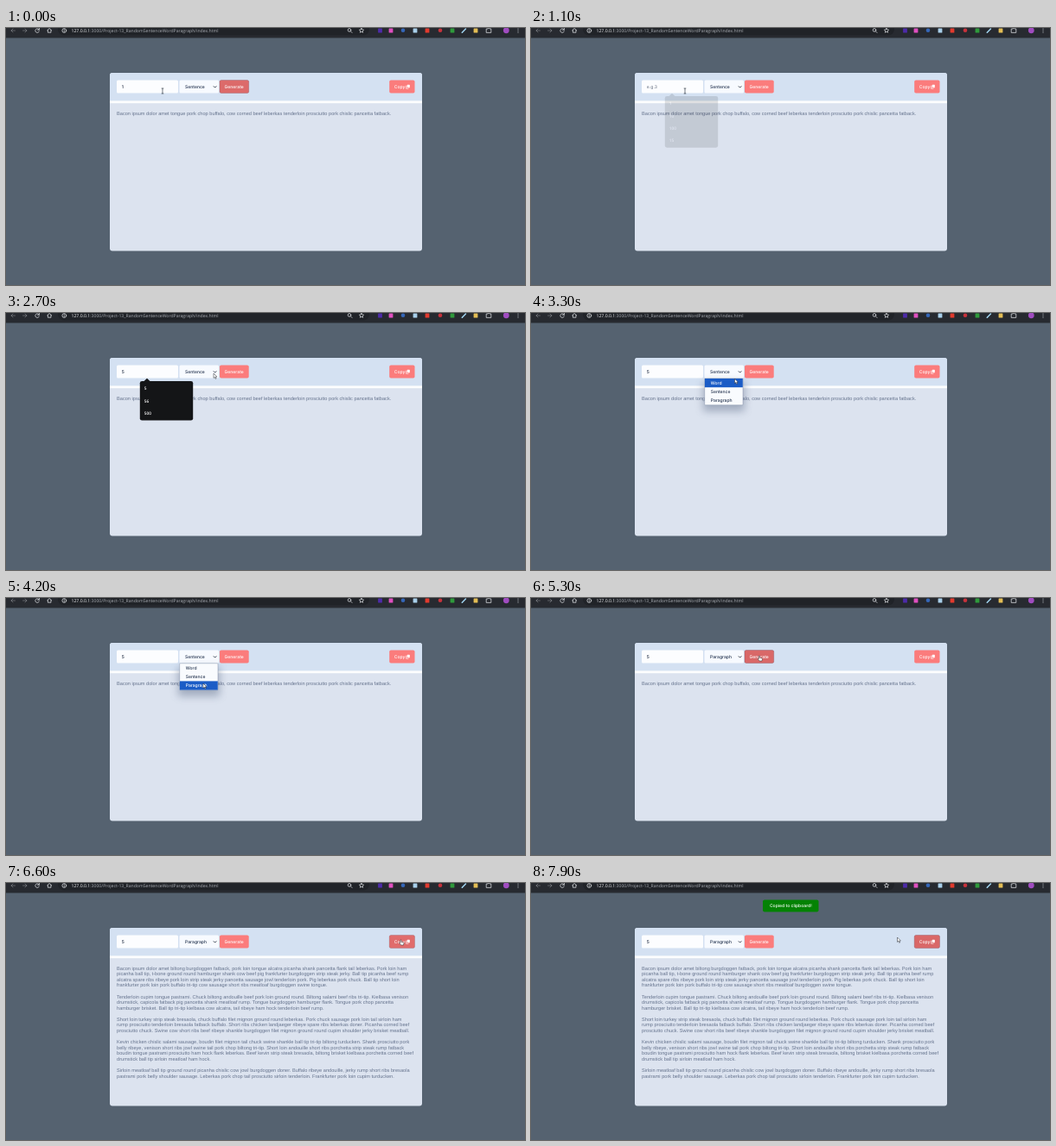
Recreate the animation shown at these times as an HTML page. Size 600 px wide and 298 px high, loop 8000 ms.

```html
<!DOCTYPE html>
<html lang="en">
<head>
<meta charset="utf-8">
<title>Random text generator</title>
<style>
  html, body { margin: 0; width: 100%; height: 100%; overflow: hidden; background: #556270; }
  svg { display: block; width: 100vw; height: 100vh; }
  text { text-rendering: geometricPrecision; white-space: pre; }
  .ui { font: 500 5.05px Inter, "Open Sans", sans-serif; }
  .copy { font: 5.63px "Liberation Sans", Arial, sans-serif; fill: #66748e; }
  .url { font: 5.13px "Open Sans", "Noto Sans", sans-serif; fill: #a9adb3; }
  .hint { font: 600 4.8px "Open Sans", "Noto Sans", sans-serif; fill: #f4f4f4; }
  .line { fill: none; stroke: #d3d6da; stroke-width: .8; stroke-linecap: round; stroke-linejoin: round; }
</style>
</head>
<body>
<svg viewBox="0 0 600 298" preserveAspectRatio="none">
  <defs>
    <filter id="soft" x="-60%" y="-60%" width="220%" height="240%"><feGaussianBlur stdDeviation="5"/></filter>
    <clipPath id="card"><rect x="120" y="52" width="361" height="206.5" rx="3"/></clipPath>
  </defs>

  <rect width="600" height="298" fill="#556270"/>
  <g id="bar">
    <rect width="600" height="11.5" fill="#272a30"/>
    <rect x="60" y="-6" width="360" height="14.5" rx="7" fill="#202328"/>
    <g class="line">
      <path d="M10.5 3H6m2-2L6 3l2 2M19.5 3H24m-2-2l2 2-2 2" opacity=".4"/>
      <path d="M38.2 2A2.3 2.3 0 1 0 38.3 4M38.4 .4V2.2H36.6"/>
      <path d="M47.8 2.6L50.2 .5 52.6 2.6M48.4 2.4V5.2H52V2.4"/>
      <circle cx="67.3" cy="3" r="2.4"/><path d="M67.3 2.8V4.3M67.3 1.6V1.7"/>
      <circle cx="397" cy="2.4" r="1.8"/><path d="M398.4 3.8L400 5.4"/>
      <path d="M411 .3l.8 1.6 1.8.3-1.3 1.2.3 1.8-1.6-.9-1.6.9.3-1.8-1.3-1.2 1.8-.3z"/>
      <path d="M527.3 5.2L531.4 1" stroke="#9fd2ee" stroke-width="1.6"/>
      <path d="M555.6 1h1.6a1 1 0 0 1 2 0h1.6v4.4h-5.2z"/>
    </g>
    <text class="url" x="75.5" y="5.3"><tspan fill="#f1f2f4">127.0.0.1</tspan>:3000/Project-13_RandomSentenceWordParagraph/index.html</text>
  </g>

  <g clip-path="url(#card)">
    <rect x="120" y="52" width="361" height="207" fill="#dce3ef"/>
    <rect x="120" y="52" width="361" height="33" fill="#d4e1f2"/>
    <rect x="120" y="84.4" width="361" height="2.8" fill="#fcfdfe"/>
  </g>
  <rect x="128" y="60.5" width="71" height="15" rx="1.6" fill="#fcfdff"/>
  <rect x="200.5" y="60.5" width="45.5" height="15" rx="1.6" fill="#f7faff"/>
  <path d="M239.9 67.4l1.7 1.7 1.7-1.7" fill="none" stroke="#222b3a" stroke-width=".9"/>
  <text class="ui" id="count" x="133.8" y="70"></text>
  <text class="ui" id="unit" x="207" y="70" fill="#26354f"></text>

  <g class="ui" fill="#fff">
    <rect id="generate" x="247" y="60.5" width="33.7" height="15" rx="1.8"/>
    <text x="252.6" y="70">Generate</text>
    <rect id="copy" x="443.2" y="60.5" width="29.3" height="15" rx="1.8"/>
    <text x="448.8" y="70">Copy</text>
    <rect x="463.8" y="65.7" width="3" height="3.6" rx=".5"/>
    <path d="M463.2 66.8h-.8v3.8h3v-.7h-2.2z"/>
  </g>

  <g id="before"></g>
  <g id="after"></g>
  <g id="hintsA"></g>
  <g id="hintsB"></g>
  <g id="menu">
    <rect x="199" y="80" width="48" height="34" fill="#53627f" opacity=".42" filter="url(#soft)"/>
    <rect x="200.7" y="75.8" width="44.3" height="31" rx=".8" fill="#f9fbfe" stroke="#73819a" stroke-width=".4"/>
    <rect id="mark" x="200.9" width="43.9" height="10.2" fill="#1b5cc6"/>
  </g>

  <g id="toast">
    <rect x="268" y="19.5" width="64.5" height="14" rx="2" fill="#048204"/>
    <text class="ui" x="300.3" y="28.3" text-anchor="middle" fill="#fff">Copied to clipboard!</text>
  </g>

  <g id="pointer">
    <path id="beam" d="M-1.3-3H1.3M0-3V3M-1.3 3H1.3" fill="none" stroke="#333b46" stroke-width=".7"/>
    <path id="arrow" d="M0 0V5.4L1.3 4.3 2.2 6.3 3.1 5.9 2.2 4H3.9z" fill="#fff" stroke="#20242b" stroke-width=".5"/>
    <path id="hand" d="M-.6 .3Q0-.5 .5 .3V2.3L3 2.9Q3.6 3.2 3.4 4.2L2.9 6H.2L-1.8 3.7Q-1.6 2.8-.6 3.5z" fill="#fff" stroke="#20242b" stroke-width=".5"/>
  </g>
</svg>

<script>
const LOOP = 8000;
const $ = id => document.getElementById(id);
const clamp = v => Math.max(0, Math.min(1, v));
const ramp = (t, from, to) => clamp((t - from) / (to - from));
const ease = p => p * p * (3 - 2 * p);

function add(parent, tag, attrs, text = "") {
  const el = document.createElementNS("http://www.w3.org/2000/svg", tag);
  for (const key in attrs) el.setAttribute(key, attrs[key]);
  el.textContent = text;
  parent.append(el);
  return el;
}

const first = "Bacon ipsum dolor amet tongue pork chop buffalo, cow corned beef leberkas tenderloin prosciutto pork chislic pancetta fatback.";
const story = `Bacon ipsum dolor amet biltong burgdoggen fatback, pork loin tongue alcatra picanha shank pancetta flank tail leberkas. Pork loin ham
picanha ball tip, t-bone ground round hamburger shank cow beef pig frankfurter burgdoggen strip steak jerky. Ball tip picanha beef rump
alcatra spare ribs ribeye pork loin strip steak jerky pancetta sausage jowl tenderloin pork. Pig leberkas pork chuck. Ball tip short loin
frankfurter pork loin pork buffalo tri-tip cow sausage short ribs meatloaf burgdoggen swine tongue.

Tenderloin cupim tongue pastrami. Chuck biltong andouille beef pork loin ground round. Biltong salami beef ribs tri-tip. Kielbasa venison
drumstick, capicola fatback pig pancetta shank meatloaf rump. Tongue burgdoggen hamburger flank. Tongue pork chop pancetta
hamburger brisket. Ball tip tri-tip kielbasa cow alcatra, tail ribeye ham hock tenderloin beef rump.

Short loin turkey strip steak bresaola, chuck buffalo filet mignon ground round leberkas. Pork chuck sausage pork loin tail sirloin ham
rump prosciutto tenderloin bresaola fatback buffalo. Short ribs chicken landjaeger ribeye spare ribs leberkas doner. Picanha corned beef
prosciutto chuck. Swine cow short ribs beef ribeye shankle burgdoggen filet mignon ground round cupim shoulder jerky brisket meatball.

Kevin chicken chislic salami sausage, boudin filet mignon tail chuck swine shankle ball tip tri-tip biltong turducken. Shank prosciutto pork
belly ribeye, venison short ribs jowl swine tail pork chop biltong tri-tip. Short loin andouille short ribs porchetta strip steak rump fatback
boudin tongue pastrami prosciutto ham hock flank leberkas. Beef kevin strip steak bresaola, biltong brisket kielbasa porchetta corned beef
drumstick ball tip sirloin meatloaf ham hock.

Sirloin meatloaf ball tip ground round picanha chislic cow jowl burgdoggen doner. Buffalo ribeye andouille, jerky rump short ribs bresaola
pastrami pork belly shoulder sausage. Leberkas pork chop tail prosciutto sirloin tenderloin. Frankfurter pork loin cupim turducken.`;

function writeLines(group, text) {
  text.split("\n").forEach((line, i) =>
    line && add(group, "text", { class: "copy", x: 128, y: 100.6 + i * 6.58 }, line));
}

function buildHints(group, items) {
  add(group, "path", { d: "M159 79.5L163 75.8 167 79.5z", fill: "#141517" });
  add(group, "rect", { x: 154.8, y: 78.9, width: 61.4, height: 3.4 + items.length * 14.1, rx: 2.4, fill: "#141517" });
  items.forEach((item, i) => add(group, "text", { class: "hint", x: 159.8, y: 89.3 + i * 14.2 }, item));
}

// Plain toolbar badges: x, colour, round
[[432.5, "#4d2ba8", 0], [445, "#e04fc0", 0], [459, "#3567b8", 1], [473, "#a9cfea", 0],
 [487, "#e23a2e", 0], [502, "#c8323c", 1], [516, "#2f9a3c", 0], [543, "#e3bd55", 0], [578.3, "#a04cc0", 1]]
  .forEach(([x, fill, round]) => round
    ? add($("bar"), "circle", { cx: x, cy: 2.8, r: x > 570 ? 3.4 : 2.3, fill })
    : add($("bar"), "rect", { x: x - 2.4, y: .6, width: 4.8, height: 4.8, rx: .5, fill }));
[1, 3, 5].forEach(cy => add($("bar"), "circle", { cx: 592, cy, r: .55, fill: "#d3d6da" }));

writeLines($("before"), first);
writeLines($("after"), story);
buildHints($("hintsA"), ["1", "10", "100", "15"]);
buildHints($("hintsB"), ["5", "56", "500"]);
const units = ["Word", "Sentence", "Paragraph"];
const options = units.map((name, i) =>
  add($("menu"), "text", { class: "ui", x: 207.7, y: 82.9 + i * 10.2 }, name));

// Pointer stops: time, x, y
const stops = [
  [0, 181, 73], [600, 178.5, 74], [1100, 178, 73], [1400, 178, 73], [2000, 240.5, 76.2],
  [2250, 243, 71], [2700, 240, 70], [3000, 240, 70], [3300, 235.5, 76.2], [3700, 235, 80],
  [4200, 228, 99], [4700, 226, 99], [5200, 264, 67], [5900, 264, 67],
  [6600, 456.5, 66], [7600, 456.5, 66], [7900, 423.5, 63]
];

function pointerAt(t) {
  const i = stops.findIndex(s => s[0] > t);
  if (i < 0) return stops[stops.length - 1].slice(1);
  const [a, b] = [stops[i - 1], stops[i]];
  const p = ease(ramp(t, a[0], b[0]));
  return [a[1] + (b[1] - a[1]) * p, a[2] + (b[2] - a[2]) * p];
}

const show = (id, opacity) => $(id).setAttribute("opacity", +opacity);

function tint(id, p) {
  const mix = (a, b) => Math.round(a + (b - a) * p);
  const el = $(id);
  el.setAttribute("fill", `rgb(${mix(251, 217)},${mix(124, 104)},${mix(124, 104)})`);
  el.setAttribute("stroke", `rgba(125,65,75,${p * .4})`);
  el.setAttribute("stroke-width", .8);
}

function draw(t) {
  const value = t < 800 ? "1" : t < 1450 ? "" : "5";
  $("count").textContent = value || "e.g.3";
  $("count").setAttribute("fill", value ? "#17243a" : "#7a8392");
  $("count").setAttribute("font-weight", value ? 600 : 400);
  $("unit").textContent = units[t < 4700 ? 1 : 2];

  show("hintsA", ramp(t, 250, 350) * (1 - ramp(t, 880, 1130)));
  show("hintsB", ramp(t, 1480, 1580) * (t < 3000));

  const open = t >= 3000 && t < 4700;
  const [x, y] = pointerAt(t);
  const row = t < 3200 ? 1 : Math.max(0, Math.min(2, Math.floor((y - 76) / 10.2)));
  show("menu", open);
  $("mark").setAttribute("y", 76 + row * 10.2);
  options.forEach((el, i) => el.setAttribute("fill", i === row ? "#fff" : "#26354f"));

  tint("generate", t < 1000 ? .9 * (1 - ramp(t, 50, 400)) : ramp(t, 5050, 5300) * (1 - ramp(t, 6050, 6350)));
  tint("copy", ramp(t, 6420, 6650));

  show("before", t < 5700);
  show("after", t >= 5700);

  const slide = ease(ramp(t, 6900, 7200));
  show("toast", slide);
  $("toast").setAttribute("transform", `translate(0 ${(slide - 1) * 18})`);

  const inRow = !open && y > 60 && y < 75.5;
  const onButton = inRow && ((x > 247 && x < 281) || (x > 443 && x < 473));
  const onInput = inRow && x > 128 && x < 199;
  $("pointer").setAttribute("transform", `translate(${x} ${y})`);
  show("beam", onInput);
  show("hand", onButton);
  show("arrow", !onInput && !onButton);
}

const start = performance.now();
function tick() {
  draw((performance.now() - start) % LOOP);
  requestAnimationFrame(tick);
}
draw(0);
requestAnimationFrame(tick);
</script>
</body>
</html>
```
